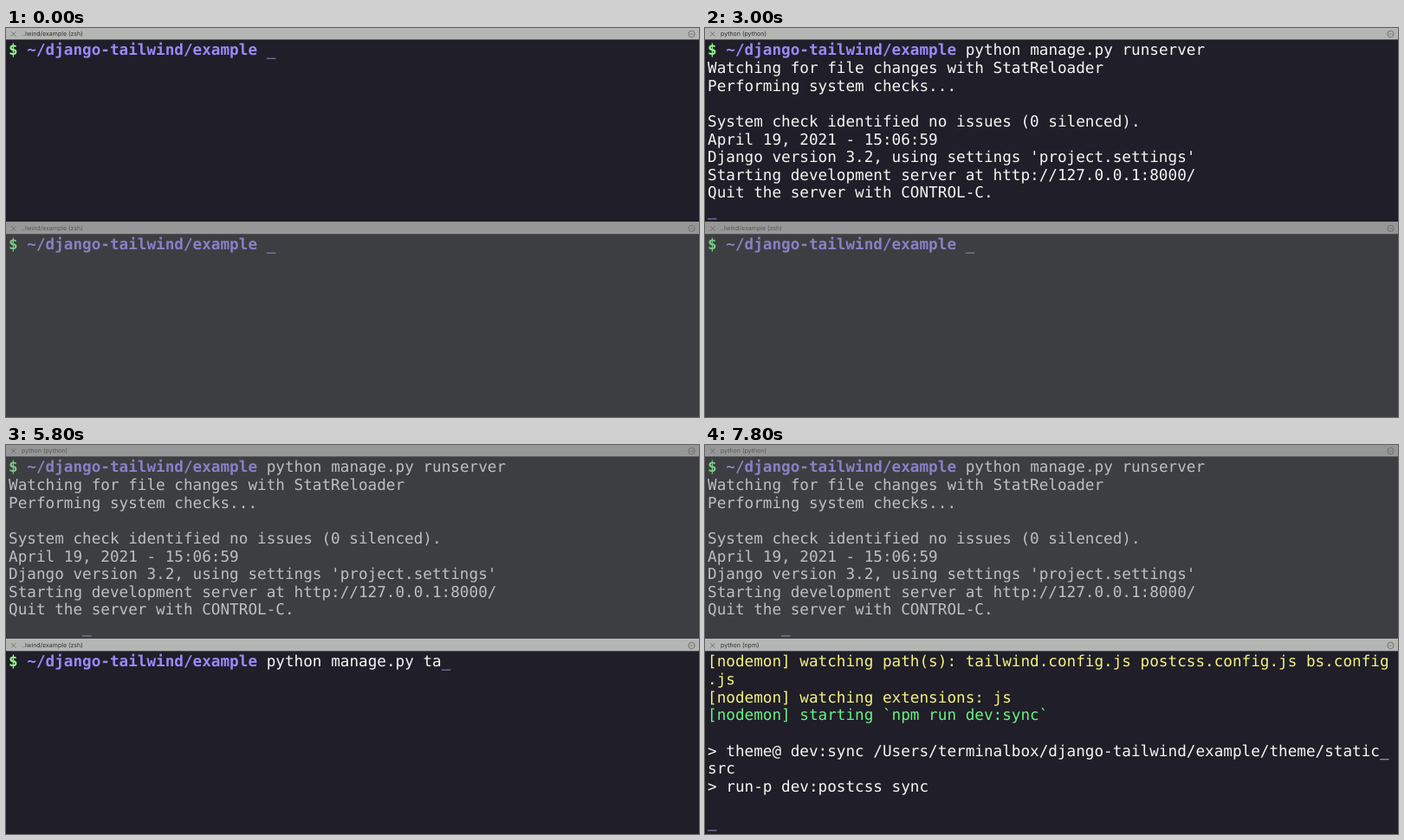
Write an HTML page that moves like this. It is 800x450 px and loops after 8 s.

```html
<!DOCTYPE html>
<html lang="en">
<head>
<meta charset="utf-8">
<title>Split terminal</title>
<style>
  html, body { margin: 0; width: 100%; height: 100%; overflow: hidden; background: #201e28; }
  svg { display: block; width: 800px; height: 450px; }
  text { white-space: pre; text-rendering: geometricPrecision; }
  .row text { font: 17.66px "DejaVu Sans Mono", "Liberation Mono", monospace; }
  .row .sign, .row .path { font-weight: bold; }
  .title { font: 7px Inter, "Liberation Sans", sans-serif; }
  .icon { fill: none; stroke-width: .8; }

  .pane { --bg: #201e28; --bar: #b4b6b4; --label: #2e2e2e; --icon: #626262;
          --sign: #92fb88; --path: #9a89fb; --plain: #f6f6f4; --cursor: #79719f; }
  .pane.dim { --bg: #3d3e41; --bar: #979797; --label: #565656; --icon: #656565;
              --sign: #78cb86; --path: #8b7fc6; --plain: #bebfbe; --cursor: #7d79a0; }
  .bg { fill: var(--bg); }
  .bar { fill: var(--bar); }
  .title { fill: var(--label); }
  .icon { stroke: var(--icon); }
  .dots { fill: var(--icon); }
  .sign { fill: var(--sign); }
  .path { fill: var(--path); }
  .plain { fill: var(--plain); }
  .yellow { fill: #f3f37c; }
  .green { fill: #6cf084; }
  .cursor { fill: var(--cursor); }
</style>
</head>
<body>
<svg id="stage" viewBox="0 0 800 450"></svg>
<script>
const LOOP = 8000, TICK = 200, SWITCH = 3200;
const CELL = 10.633, LINE = 20.62, LEFT = 3, BASE = 31.42, ROWS = 10, PROMPT = 28;
const SHELL = "..lwind/example (zsh)";
const plain = s => ["plain", s];
const yellow = s => ["yellow", s];
const green = s => ["green", s];

// Key points are [time, count]; counts run evenly in between.
const panes = [
  {
    y: 0,
    command: "python manage.py runserver",
    typing: [[0, 0], [800, 6], [1000, 6], [2600, 26]],
    printing: [[2600, 0], [3000, 8]],
    program: "python (python)",
    focused: t => t < SWITCH,
    column: t => t < SWITCH ? 0 : 8,
    output: [
      "Watching for file changes with StatReloader",
      "Performing system checks...",
      "",
      "System check identified no issues (0 silenced).",
      "April 19, 2021 - 15:06:59",
      "Django version 3.2, using settings 'project.settings'",
      "Starting development server at http://127.0.0.1:8000/",
      "Quit the server with CONTROL-C."
    ].map(plain)
  },
  {
    y: 225,
    command: "python manage.py tailwind start",
    typing: [[3400, 0], [3600, 1], [3800, 1], [4800, 11], [5000, 12], [6200, 23], [6800, 31]],
    printing: [[7000, 0], [7800, 9]],
    program: "python (npm)",
    focused: t => t >= SWITCH,
    column: () => 0,
    output: [
      yellow("[nodemon] watching path(s): tailwind.config.js postcss.config.js bs.config"),
      yellow(".js"),
      yellow("[nodemon] watching extensions: js"),
      green("[nodemon] starting `npm run dev:sync`"),
      plain(""),
      plain("> theme@ dev:sync /Users/terminalbox/django-tailwind/example/theme/static_"),
      plain("src"),
      plain("> run-p dev:postcss sync"),
      plain("")
    ]
  }
];

function countAt(keys, t) {
  let [time, count] = keys[0];
  for (const [nextTime, next] of keys) {
    if (t < nextTime)
      return t <= time ? count : Math.round(count + (next - count) * (t - time) / (nextTime - time));
    [time, count] = [nextTime, next];
  }
  return count;
}

const escape = s => s.replace(/&/g, "&amp;").replace(/</g, "&lt;").replace(/>/g, "&gt;");
const cell = (col, y, kind, s) =>
  s ? `<text class="${kind}" x="${LEFT + col * CELL}" y="${y}">${escape(s)}</text>` : "";

const header = title => `
  <rect class="bar" y="-1" width="800" height="14.5"/>
  <rect y="13" width="800" height=".7" fill="#000" opacity=".3"/>
  <path class="icon" d="M6 4.2l5.4 5.4M11.4 4.2l-5.4 5.4"/>
  <text class="title" x="18" y="9.4">${title}</text>
  <circle class="icon" cx="791.5" cy="6.9" r="3.7"/>
  <path class="dots" d="M789.3 6.4h1v1h-1zM791 6.4h1v1h-1zM792.7 6.4h1v1h-1z"/>`;

const prompt = (y, typed) =>
  cell(0, y, "sign", "$") + cell(2, y, "path", "~/django-tailwind/example") +
  cell(PROMPT, y, "plain", typed);

function drawPane(pane, t) {
  const typed = pane.command.slice(0, countAt(pane.typing, t));
  const running = t > pane.printing[0][0];
  const lines = pane.output.slice(0, countAt(pane.printing, t));
  const last = running ? lines.length + 1 : 0;
  const scroll = Math.max(0, last + 1 - ROWS);
  const rowY = i => BASE + (i - scroll) * LINE;
  const rows = lines.map((line, i) => cell(0, rowY(i + 1), ...line));
  if (!scroll) rows.unshift(prompt(rowY(0), typed));
  const col = running ? pane.column(t) : PROMPT + typed.length;
  return `<g class="pane ${pane.focused(t) ? "" : "dim"}" transform="translate(0 ${pane.y})">
    <rect class="bg" width="800" height="225"/>
    ${header(running ? pane.program : SHELL)}
    <g class="row">${rows.join("")}</g>
    <rect class="cursor" x="${LEFT + col * CELL}" y="${rowY(last) + 3.2}" width="10.6" height="1.3"/>
  </g>`;
}

const stage = document.getElementById("stage");
let shown = "";

function render() {
  const now = performance.now() % LOOP;
  const t = now - now % TICK;
  const picture = panes.map(p => drawPane(p, t)).join("");
  if (picture !== shown) stage.innerHTML = shown = picture;
  requestAnimationFrame(render);
}
render();
</script>
</body>
</html>
```
